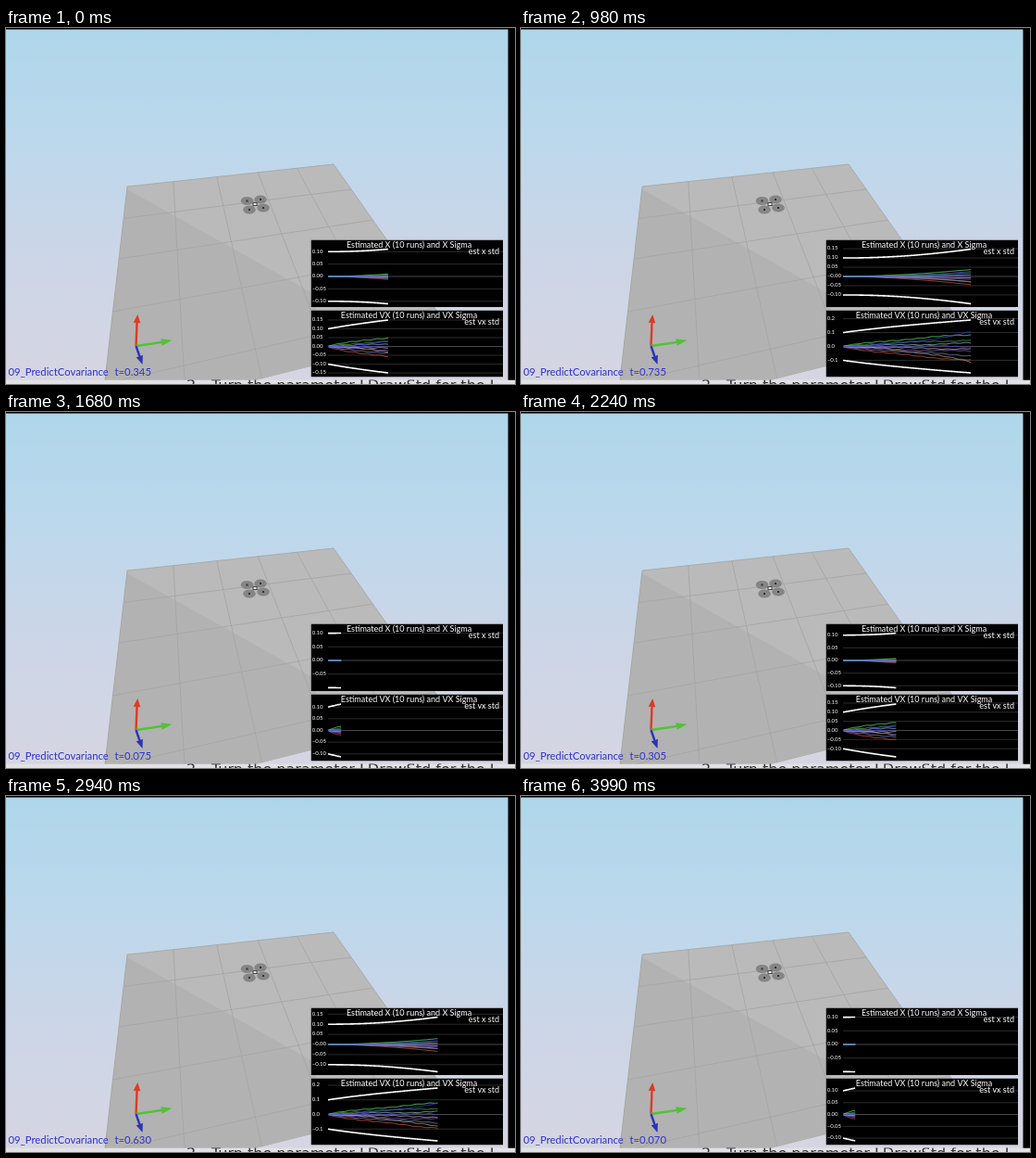
An HTML page with a canvas for the animation above (4.06 s loop, 550 px wide and 384 px high).

```html
<!DOCTYPE html>
<html lang="en">
<head>
<meta charset="utf-8">
<title>Predict covariance</title>
<style>
html, body { margin: 0; width: 100%; height: 100%; overflow: hidden; background: #000; }
canvas { display: block; width: 550px; height: 384px; }
</style>
</head>
<body>
<canvas id="stage" width="550" height="384"></canvas>
<script>
const ctx = document.getElementById('stage').getContext('2d');
const LOOP = 4060, TICK = 70, DT = 0.005, STEPS = 200;

// Clock time in ms against accumulated simulation seconds; each run lasts one second.
const PACE = [[0, .345], [980, .735], [1680, 1.075], [2240, 1.305], [2940, 1.63], [3570, 1.915], [3990, 2.07]];

function simulatedTime(clock) {
  const next = Math.max(1, PACE.findIndex(([ms]) => ms >= clock));
  const [ms0, t0] = PACE[next - 1], [ms1, t1] = PACE[next];
  return t0 + (t1 - t0) * (clock - ms0) / (ms1 - ms0);
}

const steps = f => Array.from({ length: STEPS + 1 }, (_, i) => f(i * DT));

// Runs fan out from zero; the two outermost start slowly, the others level off.
const COLORS = ['#b8a67a', '#d8553a', '#7488b8', '#8c5cc0', '#b8b8b8', '#5a48d0', '#8fb8c8', '#4aa85a', '#62e070', '#3c3cea'];
const velocities = COLORS.map((color, n) => {
  const k = (n - 4.5) / 4.5;
  const drift = .1 * k + .08 * k ** 3 - .01;
  const power = Math.abs(k) === 1 ? 1.7 : .7;
  const wobble = t => .008 * t * Math.sin(t * 13 + n * 4) + .002 * Math.min(t * 8, 1) * Math.sin(t * 83 + n * 2);
  return { color, data: steps(t => drift * t ** power + wobble(t)) };
});
const positions = velocities.map(({ color, data }) => {
  let sum = 0;
  return { color, data: data.map(v => sum += v * DT) };
});

const PLOTS = [
  {
    name: 'X', top: 228.5, bottom: 301, zero: 268, reach: 29.5, runs: positions,
    sigma: steps(t => Math.sqrt(.01 + (.015 + .0095 * t) * t * t)),
    negativeZero: s => s > .12 && s < .155
  },
  {
    name: 'VX', top: 304.5, bottom: 376.5, zero: 343.5, reach: 28.5, runs: velocities,
    sigma: steps(t => Math.sqrt(.01 + .036 * t)),
    negativeZero: () => false
  }
];

function tracePath(points) {
  ctx.beginPath();
  points.forEach(p => ctx.lineTo(...p));
}

function fillPath(color, points) {
  tracePath(points);
  ctx.fillStyle = color;
  ctx.fill();
}

function strokePath(color, width, points) {
  tracePath(points);
  ctx.strokeStyle = color;
  ctx.lineWidth = width;
  ctx.stroke();
}

function text(string, x, y, size, color, align = 'left', family = 'Lato') {
  ctx.font = `${size}px "${family}", sans-serif`;
  ctx.fillStyle = color;
  ctx.textAlign = align;
  ctx.fillText(string, x, y);
}

// Perspective map of the unit square onto the floor; u runs right, v towards the viewer.
function floorPoint(u, v) {
  const w = 1 + .1506 * u - .462 * v;
  return [(131 + 276.3 * u - 76.1 * v) / w, (171 - 1.9 * u + 56 * v) / w];
}

function drawFloor() {
  fillPath('#bababa', [floorPoint(0, 0), floorPoint(1, 0), floorPoint(1, 1), floorPoint(0, 1)]);
  ctx.save();
  ctx.clip();
  fillPath('#b2b2b2', [[131, 174], [335, 288], [335, 384], [90, 384], [131, 171]]);
  ctx.restore();
  for (let u = 0; u < 1.1; u += .2) strokePath('#a4a4a4', .8, [floorPoint(u, 0), floorPoint(u, 1)]);
  for (let v = 0; v < 1; v += .228) strokePath('#a4a4a4', .8, [floorPoint(0, v), floorPoint(1, v)]);
}

function drawDrone() {
  const rotors = [[260.5, 186.5], [275, 185], [263, 196], [278, 194]];
  strokePath('#666', 1, [rotors[0], rotors[3]]);
  strokePath('#666', 1, [rotors[1], rotors[2]]);
  for (const [x, y] of rotors) {
    ctx.fillStyle = '#858585';
    ctx.beginPath();
    ctx.ellipse(x, y, 6.8, 4.5, 0, 0, 2 * Math.PI);
    ctx.fill();
    ctx.fillStyle = '#333';
    ctx.fillRect(x - 1, y - 1, 2, 2);
  }
  ctx.fillStyle = '#444';
  ctx.fillRect(266.5, 188, 5, 4);
  ctx.fillStyle = '#eee';
  ctx.fillRect(267.5, 189, 3, 2);
}

function drawArrow(color, neck, tip) {
  const half = 3.8, dx = tip[0] - neck[0], dy = tip[1] - neck[1], length = Math.hypot(dx, dy);
  const nx = -dy / length * half, ny = dx / length * half;
  strokePath(color, 2.4, [[140.5, 343], neck]);
  fillPath(color, [[neck[0] + nx, neck[1] + ny], tip, [neck[0] - nx, neck[1] - ny]]);
}

function drawPlot({ name, top, bottom, zero, reach, runs, sigma, negativeZero }, count) {
  const left = 348, right = 537, edge = 329.5, limit = sigma[count];
  const step = limit < .155 ? .05 : .1, digits = step < .1 ? 2 : 1;
  const toY = v => zero - v * reach / limit;
  const trace = (color, width, data, sign = 1) => strokePath(color, width,
    data.slice(0, count + 1).map((v, i) => [left + 188 * DT * i, toY(v * sign)]));

  ctx.save();
  ctx.beginPath();
  ctx.rect(edge, top, right - edge, bottom - top);
  ctx.clip();
  ctx.fillStyle = '#000';
  ctx.fill();

  ctx.textBaseline = 'middle';
  for (let k = -4; k <= 4; k++) {
    const y = toY(k * step);
    if (y < top + 4 || y > bottom - 4.4) continue;
    strokePath(k ? '#2c2c2c' : '#484848', 1, [[left, y], [right, y]]);
    const minus = k < 0 || (k === 0 && negativeZero(limit)) ? '−' : '';
    text(minus + Math.abs(k * step).toFixed(digits), 330.7, y - .5, 6, '#fff');
  }
  ctx.textBaseline = 'alphabetic';

  ctx.globalAlpha = .8;
  runs.forEach(run => trace(run.color, 1, run.data));
  ctx.globalAlpha = 1;
  trace('#fff', 1.6, sigma);
  trace('#fff', 1.6, sigma, -1);
  text(`Estimated ${name} (10 runs) and ${name} Sigma`, 435.5, top + 8, 9, '#fff', 'center');
  text(`est ${name.toLowerCase()} std`, 533, top + 15.5, 9, '#fff', 'right');
  ctx.restore();
}

function drawPage() {
  ctx.save();
  ctx.beginPath();
  ctx.rect(0, 379.5, 550, 5);
  ctx.clip();
  ctx.fillStyle = '#e2e2e6';
  ctx.fill();
  text('2.', 195, 390.5, 16, '#333', 'left', 'DejaVu Sans');
  text('Turn the parameter LDrawStd for the L', 222, 390.5, 16, '#333', 'left', 'DejaVu Sans');
  ctx.restore();
}

const sky = ctx.createLinearGradient(0, 0, 0, 380);
sky.addColorStop(0, '#aed6ea');
sky.addColorStop(.3, '#bbd8ec');
sky.addColorStop(.6, '#cad6e8');
sky.addColorStop(1, '#d6d5e2');

function render(now) {
  const clock = Math.floor(now % LOOP / TICK) * TICK;
  const count = Math.round(simulatedTime(clock) / DT) % STEPS;

  ctx.fillStyle = sky;
  ctx.fillRect(0, 0, 550, 384);
  drawFloor();
  drawDrone();
  drawArrow('#dc3c22', [141.5, 318], [142.2, 309]);
  drawArrow('#52c238', [168, 339], [179.5, 336.8]);
  drawArrow('#2c34b8', [144.3, 354], [147.5, 363]);
  text('09_PredictCovariance', 2.5, 375, 11.3, '#3030cc');
  text('t=' + (count * DT).toFixed(3), 117.5, 375, 11.3, '#3030cc');

  ctx.fillStyle = '#000';
  ctx.fillRect(0, 0, 550, 1.5);
  ctx.fillRect(542.5, 0, 7.5, 380);
  drawPage();
  PLOTS.forEach(plot => drawPlot(plot, count));
}

const start = performance.now();
function tick() {
  render(performance.now() - start);
  requestAnimationFrame(tick);
}
tick();
</script>
</body>
</html>
```
